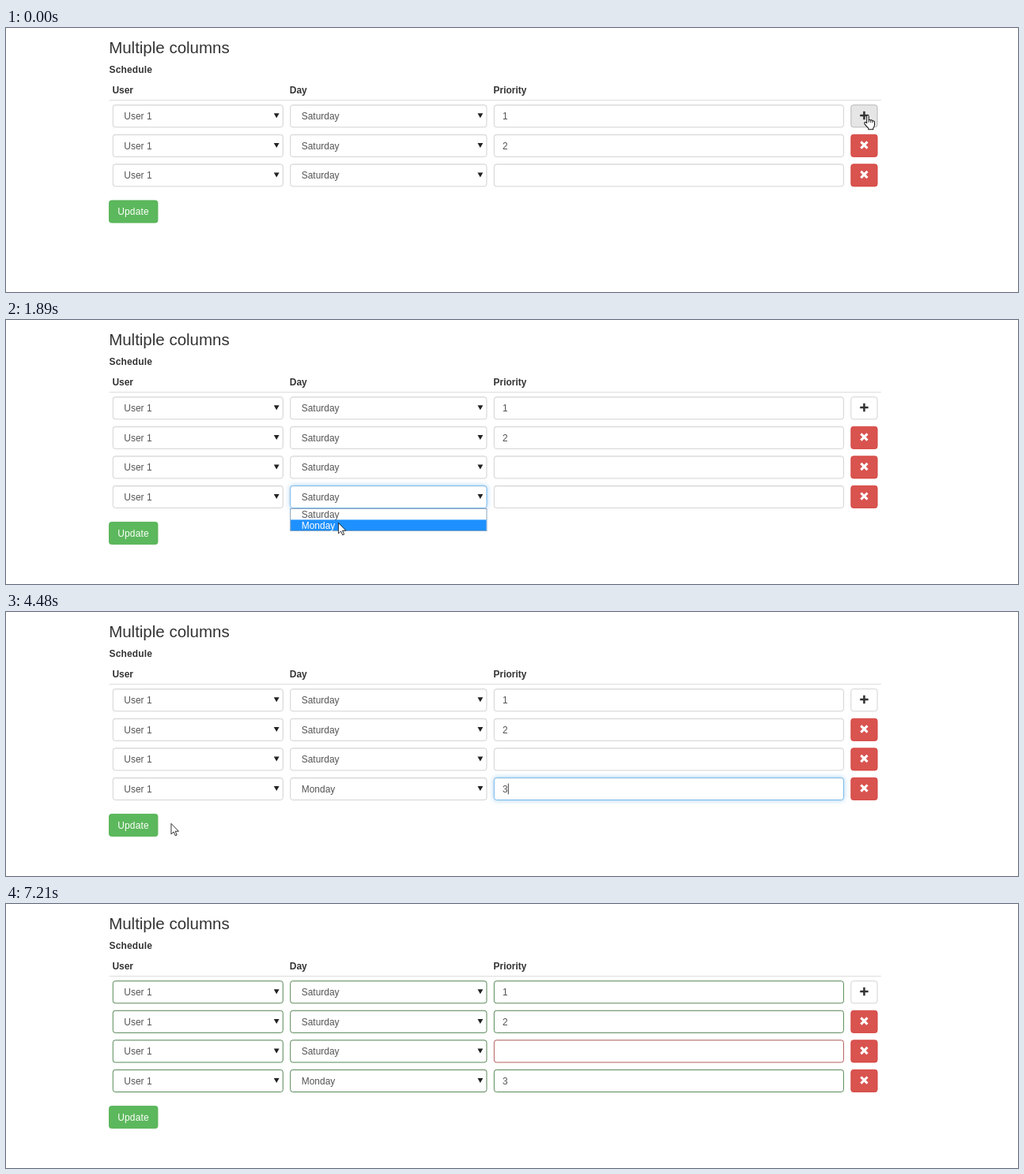
Recreate the animation shown at these times as an HTML page. Size 1280x335 px, loop 7.28 s.

```html
<!DOCTYPE html>
<html lang="en">
<head>
<meta charset="utf-8">
<title>Multiple columns</title>
<style>
html, body { margin: 0; width: 100%; height: 100%; overflow: hidden; background: #fff; }
#page {
  position: absolute; left: 0; top: 0; width: 1500px; height: 393px;
  transform: scale(.85333); transform-origin: 0 0;
  font: 14px/20px "Liberation Sans", Arial, sans-serif; color: #333;
}
#page * { position: absolute; box-sizing: border-box; white-space: nowrap; }
h3 { left: 152.5px; top: 14px; margin: 0; font-size: 24px; line-height: 30px; font-weight: 400; }
b { top: 82px; }
hr { left: 153px; top: 107px; width: 1144px; height: 1px; margin: 0; border: 0; background: #d4d4d4; }
.row { left: 0; width: 100%; height: 34px; }
.ctl {
  top: 0; height: 34px; line-height: 32px; padding-left: 12px; background: #fff;
  border: 1px solid #ccc; border-radius: 4px; color: #555;
}
.sel { padding-left: 16px; }
.user { left: 158px; width: 253px; }
.day { left: 421px; width: 292px; }
.num { left: 723px; width: 519px; }
.sel::after {
  content: ""; position: absolute; right: 5.5px; top: 11.5px;
  border: solid transparent; border-width: 7px 4px 0; border-top-color: #222;
}
.btn {
  left: 1252px; top: 0; width: 40px; height: 34px;
  border: 1px solid #d43f3a; border-radius: 4px; background: #d9534f;
}
.btn svg { left: 12px; top: 8px; width: 14px; height: 14px; fill: none; stroke: #fff; stroke-width: 3.6; }
.add { background: #fff; border-color: #ccc; }
.add svg { stroke: #333; stroke-width: 3; }
.add.hot { background: #e6e6e6; border-color: #adadad; }
#update {
  left: 152px; width: 72.6px; height: 34px; line-height: 32px; transform: translateX(.4px);
  border: 1px solid #4cae4c; border-radius: 4px; background: #5cb85c;
  color: #fff; text-align: center; letter-spacing: .2px;
}
#update.hot { background: #449d44; border-color: #398439; }
#update.focus { border-color: #4a8fb5; box-shadow: 0 0 0 1px rgba(77, 144, 254, .5); }
#update.focus.down {
  box-shadow: 0 0 0 1px rgba(77, 144, 254, .5), inset 0 3px 5px rgba(0, 0, 0, .125);
}
#menu { left: 421px; top: 280px; width: 292px; height: 34px; border: 1px solid #7494b3; background: #fff; color: #555; }
#menu div { left: 0; width: 100%; height: 16px; line-height: 16px; padding-left: 16px; }
#menu div + div { top: 16px; }
#menu .on { background: #1e90ff; color: #fff; }
#caret { top: 255px; width: 1px; height: 16px; background: #222; }
#pointer { position: absolute; left: 0; top: 0; width: 100%; height: 100%; }
#pointer path { fill: #fff; stroke: #111; stroke-linejoin: round; }
</style>
</head>
<body>
<div id="page">
  <h3>Multiple columns</h3>
  <b style="left:153px;top:52px;letter-spacing:.2px">Schedule</b>
  <b style="left:157.5px">User</b>
  <b style="left:420.5px">Day</b>
  <b style="left:722.5px">Priority</b>
  <hr>
  <div id="rows"></div>
  <div id="update">Update</div>
  <div id="menu"><div>Saturday</div><div>Monday</div></div>
  <div id="caret"></div>
</div>
<svg id="pointer">
  <g id="mark">
    <path id="arrow" d="M.5 .5V16.3L4.2 12.9L6.7 18.6L9 17.6L6.6 12H11.6Z"/>
    <g id="hand" transform="translate(-6 0)">
      <path stroke-width="1.2" d="M4.5 12.6V2.4Q4.5 .7 6 .7T7.5 2.4V8Q9.2 7 10.3 8.3Q12 7.5 13 9Q16 8.8 16 11.2V15Q16 18 14 20V22H7V20Q4 17.5 1.2 13.6Q.6 11.8 2 11.2Q3.2 11 4.5 12.6Z"/>
      <path d="M7.5 8V11.5M10.3 8.3V11.8M13 9V12.2"/>
    </g>
    <path id="beam" stroke-width="1.2" d="M-3.5-8.5H-.8M.8-8.5H3.5M0-7.8V7.8M-3.5 8.5H-.8M.8 8.5H3.5"/>
  </g>
</svg>
<script>
const LOOP = 7280, TICK = 70, S = .85333, PITCH = 44, TOP = 114;
const $ = id => document.getElementById(id);
const show = (el, on) => { el.style.display = on ? '' : 'none'; };

// Pointer journeys: visible from..till, points are [time, x, y]
const trips = [
  { from: 0, till: 3710, pts: [[140, 1090, 110], [840, 455, 252], [980, 452, 248], [1050, 452, 248],
    [1260, 448, 229], [1470, 448, 229], [1820, 420, 258], [1890, 420, 257], [2100, 420, 257], [2660, 618.5, 226.5]] },
  { from: 4410, till: 6160, pts: [[4410, 430, 247], [4480, 208.5, 268], [4620, 99, 274], [4900, 159.5, 269]] },
  { from: 6160, till: 6230, pts: [[6160, 249, 284]] },
  { from: 6510, till: 6860, pts: [[6510, 1029, 328], [6650, 1120, 316], [6790, 1219, 330]] }
];

const GREY = [204, 204, 204], BLUE = [102, 175, 233], GREEN = [60, 118, 61], RED = [169, 68, 66];
const ease = p => { p = Math.min(1, Math.max(0, p)); return p * p * (3 - 2 * p); };
const fade = (t, at) => ease((t - at) / 150);
const mix = (a, b, p) => `rgb(${a.map((v, i) => Math.round(v + (b[i] - v) * p))})`;

const icon = d => `<svg viewBox="0 0 14 14"><path d="${d}"/></svg>`;
$('rows').innerHTML = ['1', '2', '', ''].map((n, i) => `
  <div class="row" style="top:${TOP + i * PITCH}px;width:1500px">
    <div class="ctl sel user">User 1</div>
    <div class="ctl sel day">Saturday</div>
    <div class="ctl num">${n}</div>
    <div class="btn ${i ? '' : 'add'}">${icon(i ? 'M2.2 2.2L11.8 11.8M11.8 2.2L2.2 11.8' : 'M7 .9V13.1M.9 7H13.1')}</div>
  </div>`).join('');

const rows = [...document.querySelectorAll('.row')];
const controls = rows.map(r => [...r.querySelectorAll('.ctl')]);
const [, day, num] = controls[3];
const dayText = day.firstChild;
const items = $('menu').children;

function locate(t) {
  const trip = trips.find(k => t >= k.from && t < k.till);
  if (!trip) return null;
  const { pts } = trip;
  const i = pts.findIndex(p => p[0] > t);
  if (i === 0) return pts[0].slice(1);
  if (i < 0) return pts[pts.length - 1].slice(1);
  const [a, b] = [pts[i - 1], pts[i]];
  const p = ease((t - a[0]) / (b[0] - a[0]));
  return [a[1] + (b[1] - a[1]) * p, a[2] + (b[2] - a[2]) * p];
}

function hit(pos, count, updateTop) {
  if (!pos) return '';
  const x = pos[0] / S, y = pos[1] / S, k = y - TOP;
  const inRow = k >= 0 && k < count * PITCH && k % PITCH < 34;
  if (inRow && x >= 723 && x < 1242) return 'num';
  if (inRow && x >= 1252 && x < 1292) return k < PITCH ? 'add' : 'remove';
  if (x >= 152 && x < 225 && y >= updateTop && y < updateTop + 34) return 'update';
  return '';
}

function paintControl(el, focus, valid, end) {
  el.style.borderColor = valid > 0 ? mix(GREY, end, valid) : mix(GREY, BLUE, focus);
  el.style.boxShadow = 'inset 0 1px 1px rgba(0,0,0,.075)' +
    (focus > 0 ? `, 0 0 8px rgba(102,175,233,${.6 * focus})` : '');
}

function draw(t) {
  const count = t < 140 ? 3 : 4;
  const updateTop = count === 4 ? 300 : 256;
  const pos = locate(t);
  const over = hit(pos, count, updateTop);

  show(rows[3], count === 4);
  const valid = fade(t, 5110);
  const dayFocus = fade(t, 1260) - fade(t, 2660);
  const numFocus = fade(t, 2660) - fade(t, 4900);
  controls.forEach((row, r) => row.forEach((el, c) => {
    const focus = el === day ? dayFocus : el === num ? numFocus : 0;
    paintControl(el, focus, valid, r === 2 && c === 2 ? RED : GREEN);
  }));
  dayText.data = t < 2100 ? 'Saturday' : 'Monday';
  num.textContent = t < 4270 ? '' : '3';

  show($('menu'), t >= 1330 && t < 2100);
  const second = !!pos && pos[1] > 253.4;
  items[0].className = second ? '' : 'on';
  items[1].className = second ? 'on' : '';

  const blink = at => t >= at && t < at + 490;
  show($('caret'), blink(2660) || blink(3640) || blink(4270));
  $('caret').style.left = (t < 4270 ? 736 : 744) + 'px';

  document.querySelector('.add').classList.toggle('hot', over === 'add');
  const focused = t >= 4900 && t < 7210;
  const up = $('update');
  up.style.top = updateTop + 'px';
  up.classList.toggle('hot', focused || over === 'update');
  up.classList.toggle('focus', focused);
  up.classList.toggle('down', t >= 4900 && t < 5180);

  show($('mark'), pos);
  if (pos) $('mark').setAttribute('transform', `translate(${pos[0]} ${pos[1]}) scale(${S})`);
  show($('beam'), over === 'num');
  show($('hand'), over && over !== 'num');
  show($('arrow'), !over);
}

const start = performance.now();
function frame() {
  const t = (performance.now() - start) % LOOP;
  draw(Math.floor(t / TICK) * TICK);
  requestAnimationFrame(frame);
}
frame();
</script>
</body>
</html>
```
